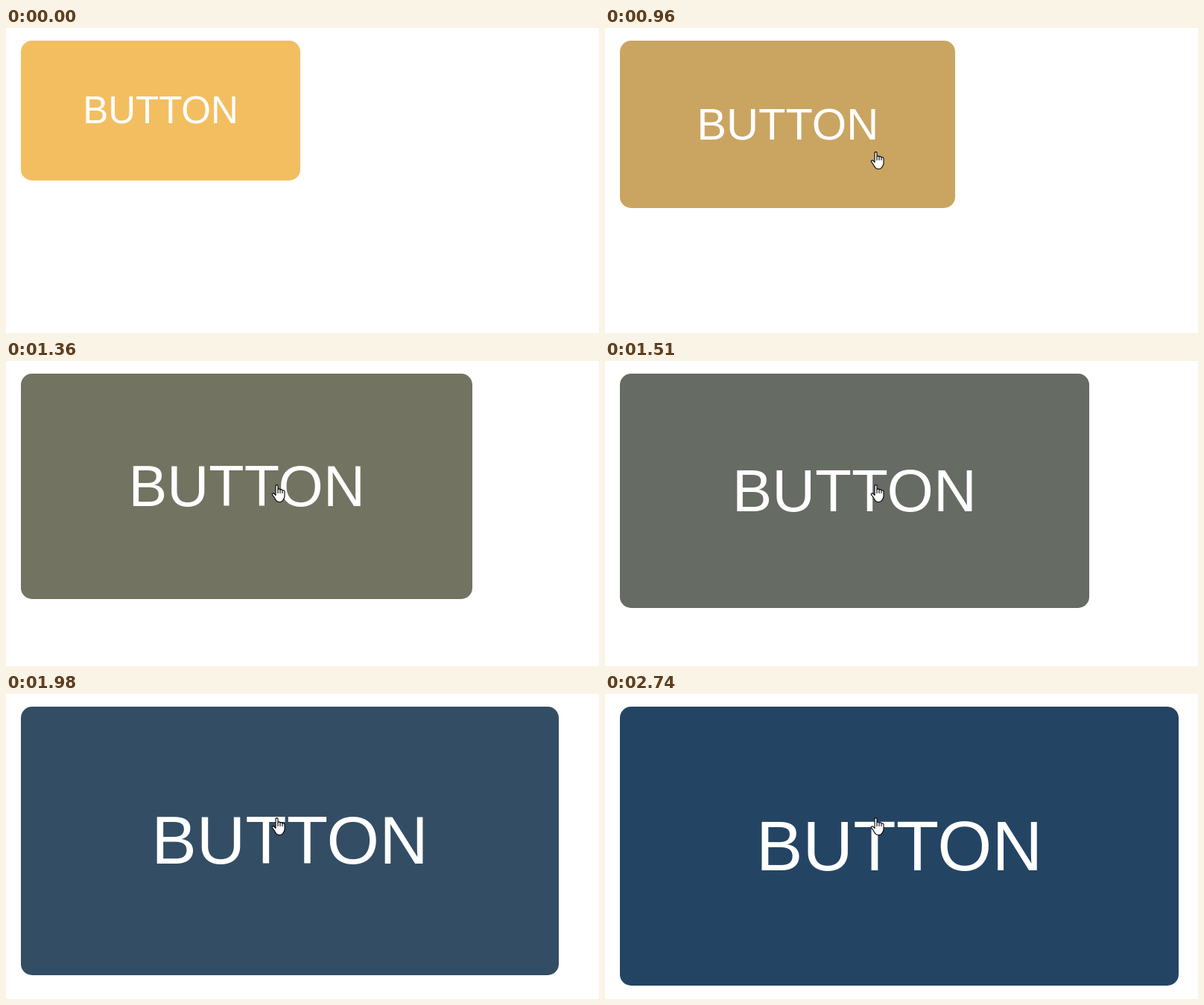
An HTML page that plays this animation: 796x410 px, repeating every 4010 ms.

```html
<!DOCTYPE html>
<html lang="en">
<head>
<meta charset="utf-8">
<title>Button hover</title>
<style>
  html, body { margin: 0; width: 100%; height: 100%; overflow: hidden; background: #fff; }
  #button {
    position: absolute; left: 20px; top: 17px; border-radius: 15px;
    display: flex; align-items: center; justify-content: center;
    color: #fff; font-family: "Liberation Sans", Arial, sans-serif; line-height: normal;
  }
  svg { position: absolute; left: 0; top: 0; overflow: visible; }
  svg path { fill: #fff; stroke: #000; stroke-width: 1.1; stroke-linejoin: round; stroke-linecap: round; }
</style>
</head>
<body>
<div id="button">BUTTON</div>
<svg id="cursor" width="20" height="26">
  <path id="arrow" d="M.5.5V16.5L4.2 13 6.8 18.6 9.2 17.5 6.7 12H11.8Z"/>
  <g id="hand" transform="translate(-6.5 -1)">
    <path d="M5.5 14.5V2.2Q5.5.6 7 .6T8.5 2.2V7Q8.7 5.9 10 5.9T11.5 7.3Q11.8 6.6 13 6.6T14.5 8.2Q14.8 7.6 15.9 7.7T17.5 9.5V15.5Q17.5 17.5 16.4 19.2 15.2 21.3 14.2 22.3 12.8 23.5 10.5 23.5 7.8 23.5 6.2 21.6 4.7 19.6 3.6 17.3 2.6 15.6.9 13.9.3 12.6 1.5 12 2.8 11.6 4 12.9Z"/>
    <path d="M8.5 7V11.5M11.5 7.5V11.5M14.5 8.5V11.5"/>
  </g>
</svg>
<script>
const LOOP = 4010, ENTER = 350, MOVE = 414, HOVER = 645, GROW = 2000;
const TICKS = [0, 350, 430, 505, 580, 660, 735, 810, 890, 960, 1040, 1125, 1210, 1270, 1360, 1440,
  1515, 1590, 1665, 1740, 1830, 1910, 1980, 2060, 2140, 2220, 2310, 2400, 2480, 2540, 2640, 2740];
const FROM = [243, 190, 96], TO = [36, 68, 100];

const [button, cursor, arrow, hand] =
  ["button", "cursor", "arrow", "hand"].map(id => document.getElementById(id));
const clamp = v => Math.min(1, Math.max(0, v));
const mix = (a, b, k) => a + (b - a) * k;
const bezier = (a, b, s) => 3 * a * s * (1 - s) ** 2 + 3 * b * s * s * (1 - s) + s ** 3;

// CSS "ease": cubic-bezier(.25, .1, .25, 1)
function ease(x) {
  let lo = 0, hi = 1;
  for (let i = 0; i < 24; i++) {
    const mid = (lo + hi) / 2;
    if (bezier(.25, .25, mid) < x) lo = mid; else hi = mid;
  }
  return x <= 0 ? 0 : x >= 1 ? 1 : bezier(.1, 1, lo);
}

function draw(now) {
  const time = now % LOOP;
  const t = TICKS.findLast(tick => tick <= time);

  const k = ease(clamp((t - HOVER) / GROW));
  const width = mix(375, 750, k);
  Object.assign(button.style, {
    width: width + "px",
    height: width / 2 + "px",
    fontSize: mix(51, 94, k) + "px",
    background: `rgb(${FROM.map((c, i) => Math.round(mix(c, TO[i], k)))})`
  });

  const m = 1 - (1 - clamp((t - ENTER) / MOVE)) ** 2;
  const x = Math.round(mix(713, 363, m)), y = Math.round(mix(286, 167, m));
  const over = t >= HOVER;
  cursor.style.transform = `translate(${x}px, ${y}px)`;
  cursor.style.display = t < ENTER ? "none" : "block";
  arrow.style.display = over ? "none" : "inline";
  hand.style.display = over ? "inline" : "none";
}

const start = performance.now();
function loop() {
  draw(performance.now() - start);
  requestAnimationFrame(loop);
}
loop();
</script>
</body>
</html>
```
